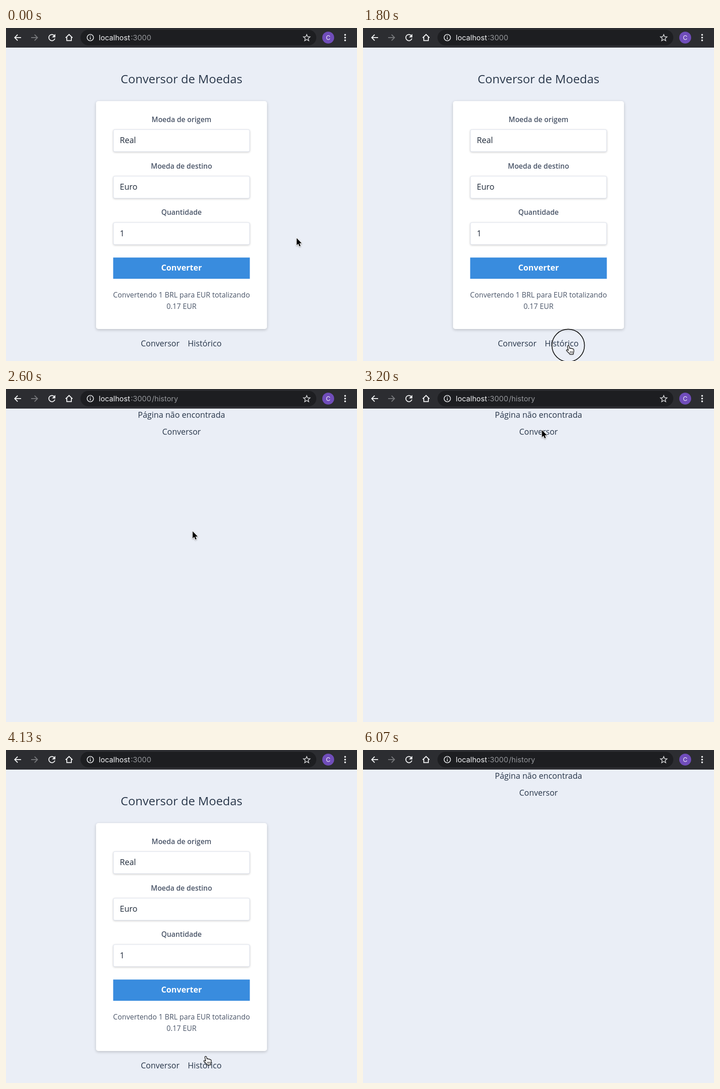
Recreate the animation shown at these times as an HTML page with a canvas. Size 768 px wide and 729 px high, loop 6.34 s.

```html
<!DOCTYPE html>
<html lang="pt">
<head>
<meta charset="utf-8">
<title>Conversor de Moedas</title>
<style>
html, body { margin: 0; width: 100%; height: 100%; overflow: hidden; background: #eaeef6; }
canvas { display: block; width: 768px; height: 729px; }
</style>
</head>
<body>
<canvas id="stage" width="768" height="729"></canvas>
<script>
const ctx = document.getElementById('stage').getContext('2d');
const LOOP = 6340, TICK = 200 / 3;
const SANS = '"Open Sans", "Noto Sans", sans-serif';
const UI = 'Inter, Roboto, sans-serif';

// Pointer waypoints: tick, x, y
const path = [
  [13, 636, 460], [23, 449, 695], [27, 449, 695], [28, 450, 695], [33, 446, 692],
  [43, 388, 105], [45, 391.5, 90], [49, 391.5, 90], [53, 394, 119], [63, 438, 686],
  [64, 443, 686], [68, 443, 686], [69, 540, 560], [70, 694, 299],
  [75, 728, 30], [77, 718, 0]
];

const within = (k, ...spans) => spans.some(([a, b]) => k >= a && k <= b);

function pointerAt(k) {
  if (k <= path[0][0]) return path[0].slice(1);
  const i = path.findIndex(p => p[0] >= k);
  const [k0, x0, y0] = path[i - 1], [k1, x1, y1] = path[i];
  const u = (k - k0) / (k1 - k0), e = u * u * (3 - 2 * u);
  return [x0 + (x1 - x0) * e, y0 + (y1 - y0) * e];
}

function text(str, x, y, size, color, { weight = 400, align = 'center', family = SANS } = {}) {
  ctx.font = `${weight} ${size}px ${family}`;
  ctx.textAlign = align;
  ctx.fillStyle = color;
  ctx.fillText(str, x, y);
}

function box(x, y, w, h, r, fill, shadow) {
  ctx.save();
  if (shadow) {
    ctx.shadowColor = shadow.color;
    ctx.shadowBlur = shadow.blur;
    ctx.shadowOffsetY = shadow.dy;
  }
  ctx.fillStyle = fill;
  ctx.beginPath();
  ctx.roundRect(x, y, w, h, r);
  ctx.fill();
  ctx.restore();
}

function dot(x, y, r, fill) {
  ctx.fillStyle = fill;
  ctx.beginPath();
  ctx.arc(x, y, r, 0, 7);
  ctx.fill();
}

function line(d, color, width = 1.9) {
  ctx.strokeStyle = color;
  ctx.lineWidth = width;
  ctx.stroke(new Path2D(d));
}

function toolbar(history) {
  box(0, 0, 768, 42, 0, '#2c2d31');
  box(0, 42, 768, 1, 0, '#414247');
  box(163, 4, 516, 34, 17, '#1d1e21');

  line('M33 21H19M25.5 14.5L19 21L25.5 27.5', '#f1f2f3');
  line('M55 21H69M62.5 14.5L69 21L62.5 27.5', '#77787b');
  line('M106 17A6.8 6.8 0 1 0 107 23', '#f1f2f3');
  ctx.fillStyle = '#f1f2f3';
  ctx.fill(new Path2D('M108 13V20.5H100.5Z'));
  line('M130.5 21.5L138 14.2L145.5 21.5M133 20V27.5H143V20', '#f1f2f3');

  line('M191.5 21A7 7 0 1 1 177.5 21A7 7 0 1 1 191.5 21M184.5 20V25M184.5 16.8V18.6', '#e3e4e6', 1.7);
  text('localhost', 203, 27, 16, '#f1f2f4', { align: 'left', family: UI });
  text(':3000', 273, 27, 16, '#96989c', { align: 'left', family: UI });
  if (history) text('/history', 319, 27, 16, '#96989c', { align: 'left', family: UI });

  const star = Array.from({ length: 10 }, (_, i) => {
    const a = -Math.PI / 2 + i * Math.PI / 5, r = i % 2 ? 3.4 : 7.6;
    return `${658 + r * Math.cos(a)} ${21.8 + r * Math.sin(a)}`;
  });
  line(`M${star.join('L')}Z`, '#d6d7d9', 1.5);

  dot(705, 21, 13, '#704dba');
  text('C', 705, 26, 13.5, '#f4f0fc', { family: UI });
  [15, 21, 27].forEach(y => dot(742, y, 1.9, '#f1f2f3'));
}

function field(label, value, y) {
  text(label, 384, y - 16.5, 15.5, '#4a5568', { weight: 600 });
  box(234.5, y, 299, 49, 4, '#dfe4ee', { color: 'rgba(0,0,0,.2)', blur: 4, dy: 1.2 });
  box(235.6, y + 1.1, 296.8, 46.8, 3, '#fff');
  text(value, 249, y + 30, 17.8, '#1f2a3a', { align: 'left' });
}

function converter() {
  text('Conversor de Moedas', 384, 121, 26.1, '#2a384b');
  box(197, 160, 374, 499, 5, '#fff', { color: 'rgba(0,0,0,.2)', blur: 6, dy: 2 });
  field('Moeda de origem', 'Real', 222);
  field('Moeda de destino', 'Euro', 324);
  field('Quantidade', '1', 425.5);
  box(234.5, 502.5, 299, 46.5, 0, '#398cde');
  text('Converter', 384, 531, 17.8, '#fff', { weight: 700 });
  text('Convertendo 1 BRL para EUR totalizando', 384, 590, 15.8, '#4a5568');
  text('0.17 EUR', 384, 614.5, 15.8, '#4a5568');
  text('Conversor', 337.3, 697, 17.6, '#273549');
  text('Histórico', 434.7, 697, 17.8, '#273549');
}

function notFound() {
  text('Página não encontrada', 384, 63, 17.75, '#273549');
  text('Conversor', 384, 100, 17.6, '#273549');
}

const arrowShape = new Path2D('M0 0V15.4L3.5 12.2L6 18L8.5 17L6.1 11.3H11Z');
const handShape = new Path2D('M-1.6 2.2C-1.8 0 1.3 -.2 1.9 1.8L3.2 6.6C4 5.4 6 5.6 6.4 7' +
  'C7.4 6 9 6.4 9.4 7.7C10.6 7 12 7.8 12.2 9.4C12.6 12.5 12.4 14.5 11.2 16.6V19.2H3.6' +
  'C2.4 16.4 -1 14.4 -3.6 11.4C-4.7 9.8 -2.6 8.8 -1.2 9.8L.3 11Z');

function pointer(k) {
  const [x, y] = pointerAt(k);
  const hand = within(k, [22, 27], [42, 47], [62, 64]);
  ctx.save();
  ctx.translate(x, y);
  ctx.lineJoin = 'round';
  ctx.shadowColor = 'rgba(0,0,0,.35)';
  ctx.shadowBlur = 3;
  ctx.shadowOffsetY = 1.2;
  ctx.fillStyle = hand ? '#fff' : '#000';
  ctx.strokeStyle = hand ? '#000' : '#fff';
  ctx.lineWidth = hand ? 1.2 : 2;
  if (hand) {
    ctx.fill(handShape);
    ctx.shadowColor = 'transparent';
    ctx.stroke(handShape);
    line('M4.3 12.5V16.5M6.8 12.5V16.5M9.3 12.5V16.5', '#000', 1);
  } else {
    ctx.stroke(arrowShape);
    ctx.shadowColor = 'transparent';
    ctx.fill(arrowShape);
  }
  ctx.restore();

  if (within(k, [23, 27], [43, 46], [63, 64])) {
    ctx.strokeStyle = '#111';
    ctx.lineWidth = 1.7;
    ctx.beginPath();
    ctx.arc(x, y, 35.6, 0, 7);
    ctx.stroke();
  }
}

function draw(time) {
  const t = time % LOOP;
  const k = Math.floor((Math.floor(t / 10) * 10 + 4) / TICK);
  box(0, 0, 768, 729, 0, '#eaeef6');
  toolbar(within(k, [29, 48], [66, 99]));
  if (within(k, [0, 27], [49, 64])) converter();
  else notFound();
  if (within(k, [0, 70], [75, 77])) pointer(k);
}

const start = performance.now();
function loop() {
  draw(performance.now() - start);
  requestAnimationFrame(loop);
}
loop();
</script>
</body>
</html>
```
